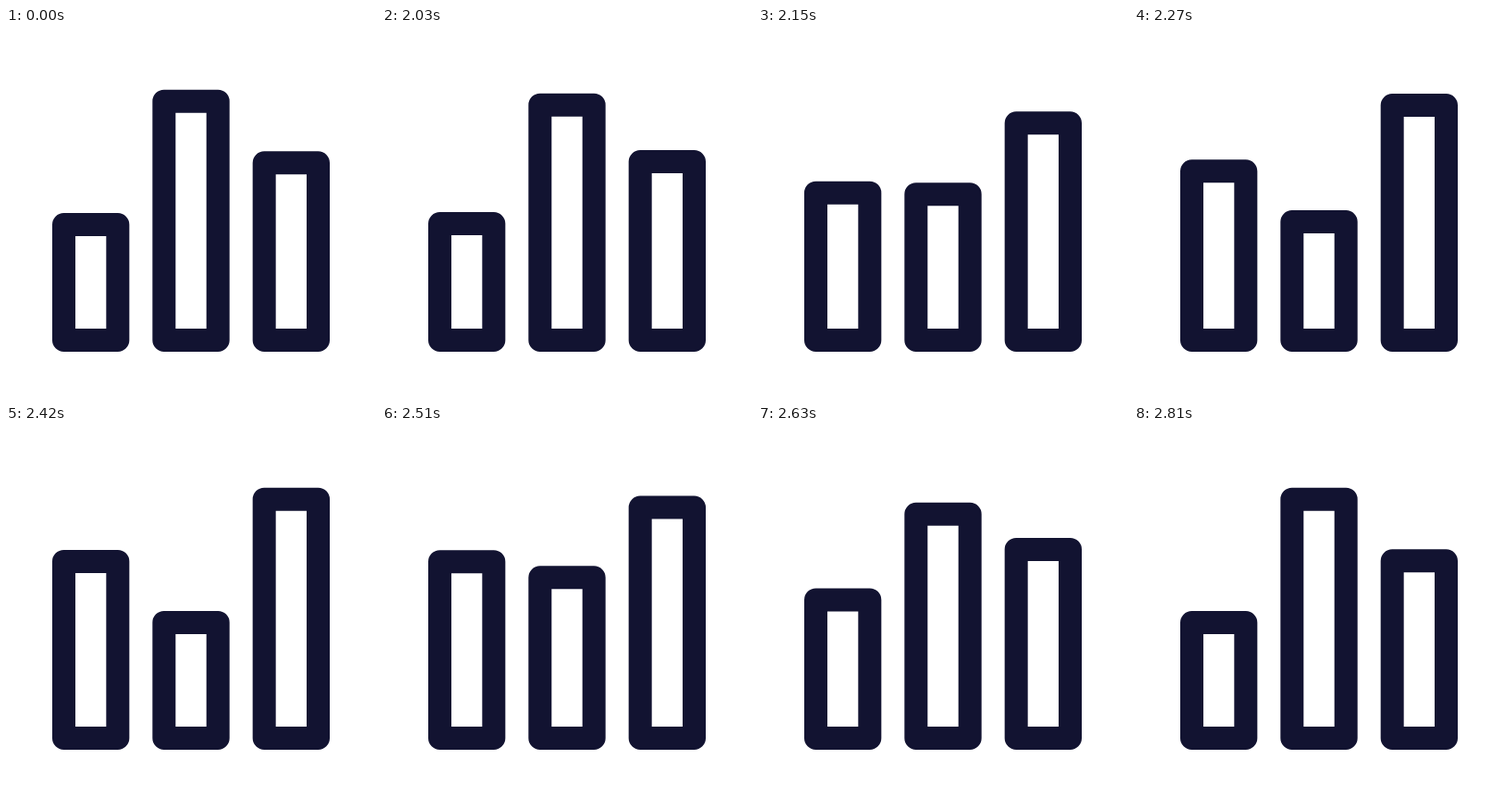
Animation of 400 by 400 pixels, one loop 3260 ms. Source, as an HTML page:

```html
<!DOCTYPE html>
<html>
<head>
<meta charset="utf-8">
<style>
html, body { margin: 0; width: 100%; height: 100%; overflow: hidden; background: #fff; }
svg { display: block; width: 100%; height: 100%; }
rect { fill: none; stroke: #121331; stroke-width: 3; stroke-linejoin: round; }
</style>
</head>
<body>
<svg viewBox="0 0 48 48"><rect/><rect/><rect/></svg>
<script>
const LOOP = 3260, START = 2000, STEP = 30, LAST = 27, BASE = 42;

// Times are counted in steps: out = length of the first move,
// back = start of the return, len = length of the return.
const bars = [
  { x: 6, rest: 24, peak: 16, out: 16.2, back: 16.2, len: 13.2 },
  { x: 19, rest: 8, peak: 24, out: 11.3, back: 13.84, len: 12.5 },
  { x: 32, rest: 16, peak: 8, out: 13.45, back: 15, len: 12.1 }
];
const rects = document.querySelectorAll('rect');

// cubic-bezier(1/3, 0, 0.14, 1)
function ease(u) {
  if (u <= 0) return 0;
  if (u >= 1) return 1;
  let lo = 0, hi = 1, s;
  for (let i = 0; i < 24; i++) {
    s = (lo + hi) / 2;
    const r = 1 - s;
    const x = r * r * s + 0.42 * r * s * s + s * s * s;
    if (x < u) lo = s; else hi = s;
  }
  return s * s * (3 - 2 * s);
}

function draw(now) {
  const n = Math.floor((now % LOOP - START) / STEP);
  bars.forEach((b, i) => {
    const k = n >= LAST ? 0 : ease(n / b.out) - ease((n - b.back) / b.len);
    const top = b.rest + (b.peak - b.rest) * k;
    const r = rects[i];
    r.setAttribute('x', b.x + 1.5);
    r.setAttribute('y', top + 1.5);
    r.setAttribute('width', 7);
    r.setAttribute('height', BASE - top - 3);
  });
}

const t0 = performance.now();
function tick() {
  draw(performance.now() - t0);
  requestAnimationFrame(tick);
}
tick();
</script>
</body>
</html>
```
